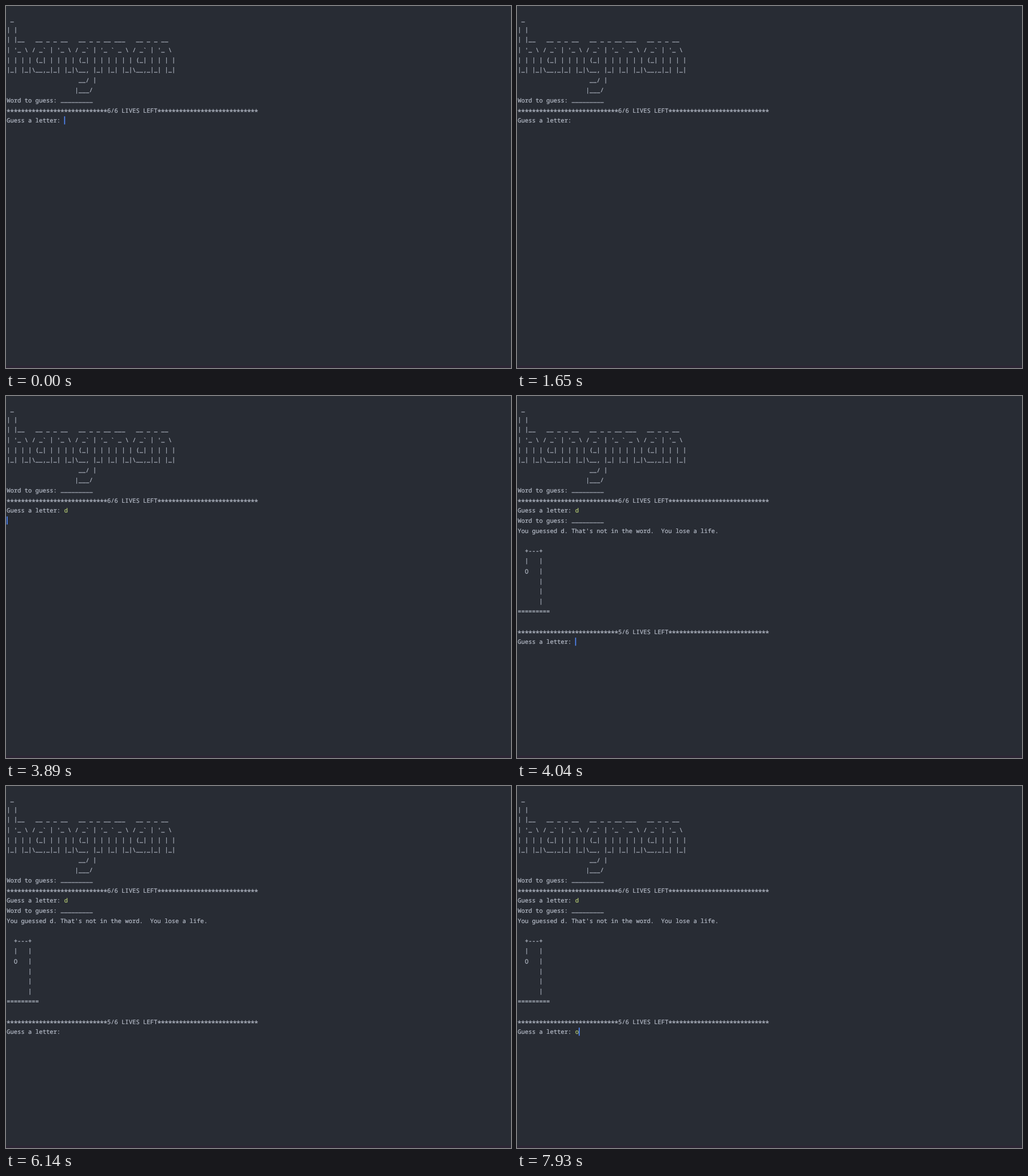
Write an HTML page that moves like this. It is 883x634 px and loops after 8000 ms.

```html
<!DOCTYPE html>
<html lang="en">
<head>
<meta charset="utf-8">
<title>Hangman</title>
<style>
  html, body { margin: 0; width: 100%; height: 100%; overflow: hidden; background: #282c34; }
  svg { display: block; }
  text {
    font-family: "Noto Sans Mono", "DejaVu Sans Mono", monospace;
    white-space: pre;
    text-rendering: geometricPrecision;
    font-variant-ligatures: none;
    fill: currentColor;
    stroke: currentColor;
    stroke-width: .22px;
  }
  #lines { color: #b4bac6; }
  .typed { color: #b4c973; }
</style>
</head>
<body>
<svg width="883" height="634" viewBox="0 0 883 634">
  <rect width="883" height="634" fill="#282c34"/>
  <rect y="630" width="883" height="4" fill="#2d2635"/>
  <g id="lines"></g>
  <rect id="caret" width="1.6" height="14.2" fill="#528bff"/>
</svg>
<script>
const LOOP = 8000, ENTER = 3890, REPLY = 4040, TYPE = 7930;
const LEFT = 1.2, BASE = 9.8, COL = 6.279, ROW = 17.69;
const SIZE = COL / 0.6;

// Size and vertical shift of the signs that sit differently from letters
const plain = { size: SIZE, shift: 0 };
const signs = {
  "*": { size: 12.5, shift: 3.4 },
  "_": { size: 9.6, shift: -0.6 },
  "|": { size: SIZE, shift: -0.6 }
};

const lines = document.getElementById("lines");
const caret = document.getElementById("caret");
const timed = [];

function put(str, row, start = 0, col = 0, cls = "") {
  for (const run of str.matchAll(/\*+|_+|\|+|[^*_|]+/g)) {
    const { size, shift } = signs[run[0][0]] || plain;
    const gap = COL - size * 0.6;
    const el = document.createElementNS("http://www.w3.org/2000/svg", "text");
    el.setAttribute("x", LEFT + (col + run.index) * COL + gap / 2);
    el.setAttribute("y", BASE + row * ROW + shift);
    el.setAttribute("class", cls);
    el.style.fontSize = size + "px";
    el.style.letterSpacing = gap + "px";
    el.textContent = run[0];
    lines.append(el);
    timed.push({ el, start });
  }
}

function block(rows, top, start) {
  rows.forEach((str, i) => put(str, top + i, start));
}

const word = "Word to guess: " + "_".repeat(9);
const prompt = "Guess a letter: ";
const post = "      |";

function banner(lives) {
  const stars = "*".repeat(28);
  return stars + lives + "/6 LIVES LEFT" + stars;
}

block([
  " _",
  "| |",
  "| |__   __ _ _ __   __ _ _ __ ___   __ _ _ __",
  "| '_ \\ / _` | '_ \\ / _` | '_ ` _ \\ / _` | '_ \\",
  "| | | | (_| | | | | (_| | | | | | | (_| | | | |",
  "|_| |_|\\__,_|_| |_|\\__, |_| |_| |_|\\__,_|_| |_|",
  "                    __/ |",
  "                   |___/",
  word,
  banner(6),
  prompt
], 1, 0);

block([
  word,
  "You guessed d. That's not in the word.  You lose a life.",
  "",
  "  +---+",
  "  |   |",
  "  O   |",
  post, post, post,
  "=".repeat(9),
  "",
  banner(5),
  prompt
], 12, REPLY);

put("d", 11, ENTER, prompt.length, "typed");
put("o", 24, TYPE, prompt.length, "typed");

// The caret toggles at each of these moments
const flips = [600, 900, 1650, 2100, 2550, 3140, 3590, ENTER,
               5090, 5540, 6140, 6590, 7040, 7640];

function caretCell(t) {
  if (t < ENTER) return [prompt.length, 11];
  if (t < REPLY) return [0, 12];
  return [prompt.length + (t >= TYPE), 24];
}

function show(el, on) {
  el.setAttribute("visibility", on ? "visible" : "hidden");
}

function draw(t) {
  timed.forEach(p => show(p.el, t >= p.start));
  const [col, row] = caretCell(t);
  show(caret, flips.filter(f => f <= t).length % 2 === 0);
  caret.setAttribute("x", LEFT + col * COL);
  caret.setAttribute("y", 193.2 + (row - 11) * ROW);
}

const began = performance.now();
function tick() {
  draw((performance.now() - began) % LOOP);
  requestAnimationFrame(tick);
}
tick();
</script>
</body>
</html>
```
